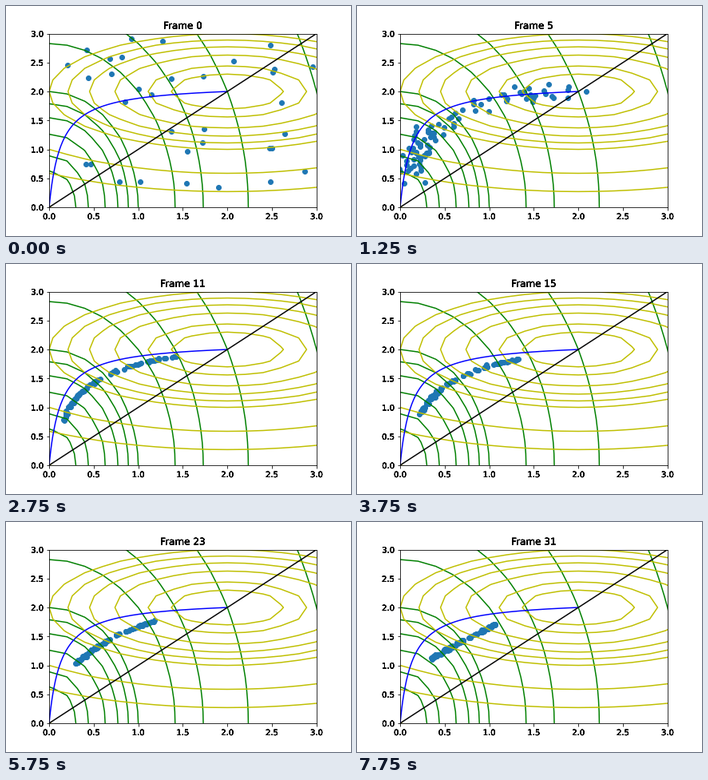
A matplotlib script for the animation above (8 s loop, 432 px wide and 288 px high).

```python
import numpy as np
import matplotlib.pyplot as plt
from matplotlib.animation import FuncAnimation
from matplotlib.patheffects import Normal

FRAMES, STEP_MS = 32, 250
LEVELS = [0.1, 0.2, 0.4, 0.6, 0.8, 1, 2, 3, 5, 10]
SIZE = 90

# Arc the population gathers on: start, bend and end at a few generations
KEYS = [2, 5, 11, 31]
ARCS = np.array([
    [(.10, .10), (.10, 1.80), (2.30, 1.90)],
    [(.14, .50), (.14, 1.80), (1.85, 2.00)],
    [(.17, .78), (.33, 1.64), (1.42, 1.88)],
    [(.35, 1.12), (.70, 1.43), (1.07, 1.71)]])

# Each individual keeps roughly the same place along the arc
PLACES = np.random.default_rng(4).beta(.75, .8, SIZE)


def front(x):
    return 32 * x / (15 * x + 2)


def arc(n, u):
    """Point u of the quadratic Bezier arc; it moves ever more slowly."""
    flat = ARCS.reshape(len(KEYS), -1)
    start, bend, end = np.reshape(
        [np.interp(np.log(n), np.log(KEYS), col) for col in flat.T], (3, 2))
    u = u[:, None]
    return (1 - u) ** 2 * start + 2 * u * (1 - u) * bend + u ** 2 * end


def population(n):
    rng = np.random.default_rng(n + 10)
    if n == 0:
        return rng.uniform(0, 3, (34, 2))
    u = np.clip(PLACES + rng.normal(0, .012, SIZE), 0, 1)
    spread = max(.38 * .62 ** (n - 2), .009)
    return arc(n, u) + rng.normal(0, spread, (SIZE, 2))


plt.rcParams["font.family"] = "DejaVu Sans"
fig, ax = plt.subplots(figsize=(6, 4), dpi=72)
fig.subplots_adjust(left=.125, right=.9, bottom=.125, top=.88)

# The grid reaches past the axes so that contours run to the border
grid = np.linspace(-1, 4, 26)
X, Y = np.meshgrid(grid, grid)
ax.contour(X, Y, X ** 2 + Y ** 2 / 4, LEVELS, colors="g")
ax.contour(X, Y, (X - 2) ** 2 / 4 + (Y - 2) ** 2, LEVELS, colors="y")
curve_x = np.linspace(0, 2, 200)
ax.plot(curve_x, front(curve_x), "b")
ax.plot([0, 3], [0, 3], "k")
dots = ax.scatter(*population(0).T, color="C0")
ticks = np.arange(0, 3.1, .5)
ax.set(xlim=(0, 3), ylim=(0, 3), xticks=ticks, yticks=ticks)
title = ax.set_title("Frame 0")

# Draw the text several times over for its heavy edges
for text in [title, *ax.get_xticklabels(), *ax.get_yticklabels()]:
    text.set_path_effects([Normal()] * 6)


def update(n):
    dots.set_offsets(population(n))
    title.set_text(f"Frame {n}")
    return dots, title


anim = FuncAnimation(fig, update, frames=FRAMES, interval=STEP_MS,
                     repeat=True, repeat_delay=0)
plt.show()
```
